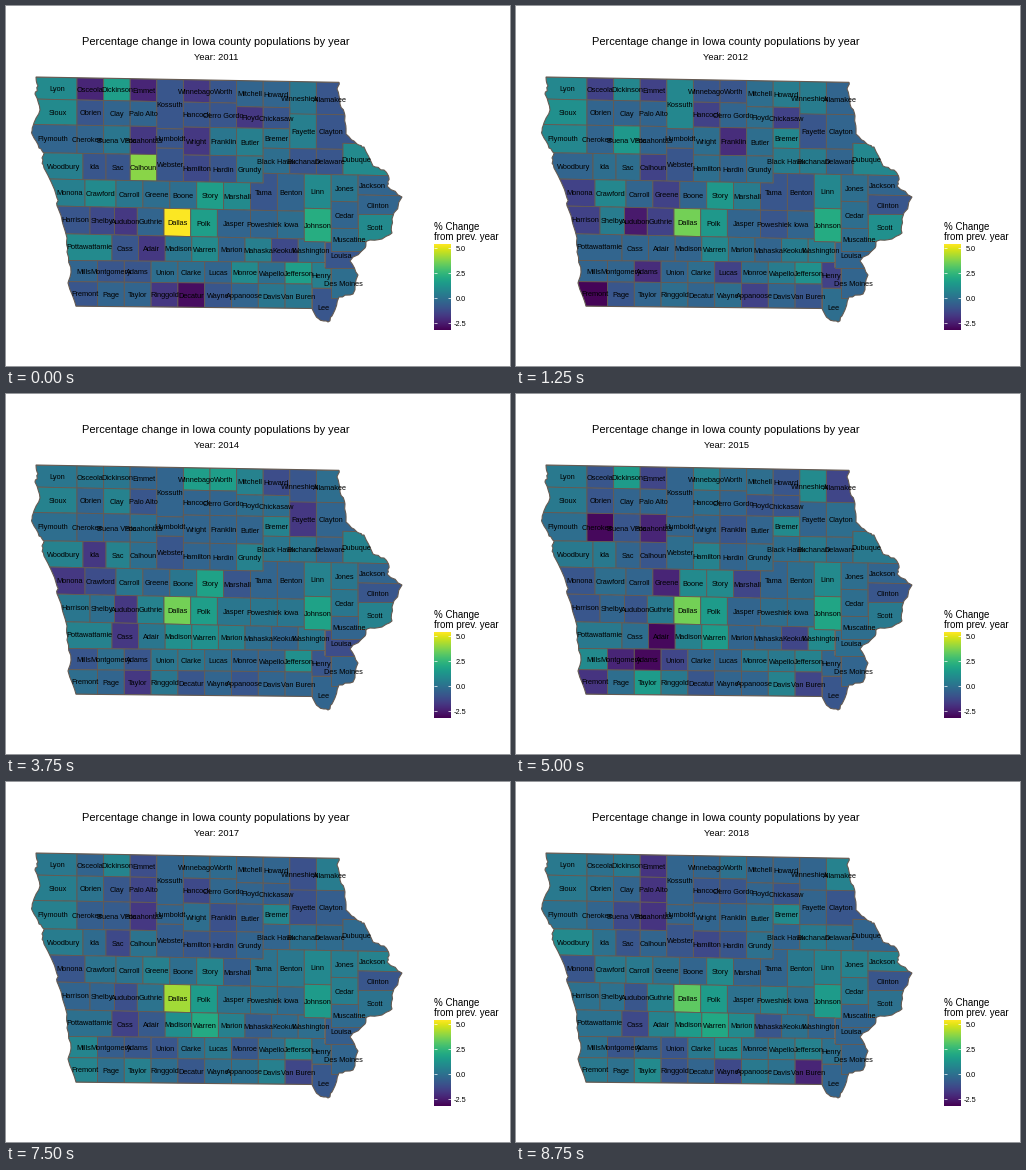
These frames come from a looping animation (504x360 px, 10 s). A matplotlib script:

```python
import numpy as np
import matplotlib.pyplot as plt
from matplotlib.animation import FuncAnimation
from matplotlib.colors import Normalize
from matplotlib.patches import Polygon

plt.rcParams["font.family"] = "Liberation Sans"
W, H, DPI = 504, 360, 72
EDGE = "#645a52"
LOW, HIGH = -3.2, 5.45
TYPICAL = -0.4

# Borders from north to south: height, tilt and the jogs along the way.
LINES = [
    (70.5, 0.0175, {}),
    (92.5, 0.02, {150.8: -22.2, 177.4: 22.2, 230.6: 3.5, 283.8: 6.5}),
    (118, 0.017, {150.8: 2, 177.4: -2, 283.8: -15}),
    (146.3, 0.015, {150.8: -6.5, 177.4: 6.5, 257.2: -8, 337: -6}),
    (172.2, 0.019, {257.2: -9.8}),
    (199, 0.021, {298.3: -3, 325.2: -7.5, 352.1: -7}),
    (226.5, 0.022, {298.3: 2.5, 325.2: -14, 352.1: -13.5}),
    (254, 0.008, {318.8: 5}),
    (275, 0.01, {305.9: 4}),
    (299.5, 0.01, {}),
]


def steps(first, gap, count):
    return [round(first + gap * i, 1) for i in range(count)]


NORTH = [20] + steps(71, 26.6, 10) + [400]
SOUTH = [20] + steps(91.5, 26.8, 9)
ROWS = [
    ("Lyon,Osceola,Dickinson,Emmet,,Winnebago,Worth,Mitchell,Howard,"
     "Winneshiek,Allamakee", NORTH),
    ("Sioux,Obrien,Clay,Palo Alto,Kossuth,Hancock,Cerro Gordo,Floyd,"
     "Chickasaw", NORTH[:10]),
    ("Plymouth,Cherokee,Buena Vista,Pocahontas,Humboldt,Wright,Franklin,"
     "Butler,Bremer,Fayette,Clayton", NORTH),
    ("Woodbury,Ida,Sac,Calhoun,Webster,Hamilton,Hardin,Grundy,Black Hawk,"
     "Buchanan,Delaware,Dubuque",
     [20, 77, 100] + steps(124.2, 26.6, 9) + [400]),
    ("Monona,Crawford,Carroll,Greene,Boone,Story,Marshall,Tama,Benton,Linn,"
     "Jones,Jackson", [20, 79] + steps(110, 26.9, 10) + [400]),
    ("Harrison,Shelby,Audubon,Guthrie,Dallas,Polk,Jasper,Poweshiek,Iowa,"
     "Johnson,Cedar,Clinton",
     [20, 84, 108.5] + steps(131.3, 26.7, 4) + steps(244.5, 26.9, 5) + [400]),
    ("Pottawattamie,Cass,Adair,Madison,Warren,Marion,Mahaska,Keokuk,"
     "Washington", [20] + steps(106, 26.6, 9)),
    ("Mills,Montgomery,Adams,Union,Clarke,Lucas,Monroe,Wapello,Jefferson,"
     "Henry", SOUTH + [325]),
    ("Fremont,Page,Taylor,Ringgold,Decatur,Wayne,Appanoose,Davis,Van Buren",
     SOUTH),
]
# River counties outside the rows: left, top, right, bottom.
RIVER = {
    "Louisa": (318.8, 236, 360, 262),
    "Muscatine": (325.2, 222, 362, 245),
    "Scott": (352, 208, 400, 234.5),
    "Lee": (306, 282, 345, 320),
    "Des Moines": (325, 262, 360, 292),
}
SHIFT = {"Plymouth": -3, "Cherokee": -3, "Winneshiek": -3, "Allamakee": 2}
EAST = [(333, 76.3), (331, 83), (334, 98), (339, 110), (340, 128), (351, 138),
        (358, 141), (367, 160), (378, 164), (383, 172), (381, 180), (396, 191),
        (386, 213), (386, 227), (376, 233), (361, 235), (359, 242), (344, 255),
        (352, 269), (347, 288), (333, 291), (327, 308), (322, 316), (313, 313),
        (306, 302.5)]
WEST = [(70, 300.2), (62, 277), (65, 266), (61, 246), (61, 232), (52, 202),
        (51, 192), (38, 162), (36, 152), (38, 147), (33, 142), (26, 128),
        (27, 120), (34, 104), (29, 88), (32, 80), (30, 71)]

# Percentage change by year; counties not listed sit at the typical value.
CHANGE = {
    2011: {
        5.4: "Dallas", 3.9: "Calhoun", 2.2: "Johnson",
        1.6: "Story,Polk,Jefferson,Dickinson",
        0.9: "Lyon,Sioux,Dubuque,Crawford,Marshall,Linn,Scott,Pottawattamie,"
             "Warren,Monroe",
        0.5: "Butler,Fayette,Woodbury,Monona,Mahaska,Henry",
        0.2: "Winneshiek,Buena Vista,Franklin,Bremer,Grundy,Carroll,Jones,"
             "Madison,Davis,Van Buren",
        -0.1: "Black Hawk,Greene,Boone,Iowa,Washington,Union,Clarke,Wapello,"
              "Des Moines,Muscatine",
        -0.9: "Kossuth,Worth,Allamakee,Obrien,Hancock,Cerro Gordo,Chickasaw,"
              "Humboldt,Clayton,Ida,Sac,Webster,Hardin,Buchanan,Delaware,Tama,"
              "Harrison,Cass,Louisa,Montgomery,Adams,Fremont,Wayne,Lee",
        -1.3: "Hamilton,Shelby,Keokuk",
        -1.8: "Winnebago,Floyd,Wright,Ringgold,Adair,Pocahontas,Audubon",
        -2.3: "Osceola,Emmet", -2.9: "Decatur",
    },
    2012: {
        3.6: "Dallas", 2.1: "Johnson", 1.4: "Polk,Story,Buena Vista",
        1.1: "Sioux,Scott,Jefferson",
        0.8: "Lyon,Dickinson,Kossuth,Plymouth,Bremer,Dubuque,Crawford,Linn,"
             "Warren",
        0.4: "Buchanan,Shelby,Washington,Howard,Winneshiek,Black Hawk,Keokuk,"
             "Wapello,Marshall",
        -0.1: "Mitchell,Floyd,Wright,Ida,Sac,Hamilton,Jones,Cedar,Muscatine,"
              "Clarke,Monroe,Ringgold,Wayne,Lee,Butler,Grundy,Marion",
        -0.9: "Winnebago,Worth,Tama,Poweshiek,Clinton,Page,Van Buren,Fayette,"
              "Webster,Benton",
        -1.5: "Emmet,Hancock,Calhoun,Guthrie,Lucas,Henry,Appanoose,Chickasaw,"
              "Osceola,Monona,Greene,Harrison",
        -2.1: "Franklin,Adams", -2.6: "Audubon", -3.1: "Fremont",
    },
    2014: {
        3.6: "Dallas", 1.8: "Story,Johnson", 1.6: "Winnebago,Worth,Polk",
        1.1: "Madison,Warren,Jefferson",
        0.6: "Sioux,Bremer,Grundy,Dubuque,Linn,Guthrie,Scott,Pottawattamie,"
             "Marion,Mitchell,Clay,Woodbury,Sac",
        0.2: "Lyon,Dickinson,Buchanan,Osceola,Black Hawk,Carroll,Boone,"
             "Harrison,Jasper,Poweshiek,Iowa,Cedar,Washington,Union,Clarke,"
             "Jones,Adair,Ringgold",
        -0.1: "Allamakee,Floyd,Chickasaw,Plymouth,Pocahontas,Calhoun,Lucas,"
              "Montgomery,Shelby,Mahaska,Fremont",
        -0.9: "Winneshiek,Palo Alto,Webster,Marshall,Clinton,Mills,Adams,"
              "Henry,Decatur,Appanoose",
        -1.2: "Howard,Crawford,Louisa",
        -1.8: "Monona,Taylor,Fayette,Ida,Audubon,Cass",
    },
    2015: {
        3.6: "Dallas", 1.9: "Johnson", 1.5: "Dickinson,Polk,Warren,Taylor",
        0.9: "Winneshiek,Bremer,Boone,Story,Linn,Mills,Washington",
        0.6: "Winnebago,Hamilton,Madison,Jefferson,Davis",
        0.3: "Lyon,Sioux,Woodbury,Ida,Buchanan,Dubuque,Guthrie,Scott,"
             "Pottawattamie,Monroe,Wapello,Ringgold",
        -0.1: "Worth,Mitchell,Hancock,Plymouth,Clayton,Webster,Grundy,"
              "Black Hawk,Delaware,Crawford,Benton,Jones,Cedar,Cass,Louisa,"
              "Muscatine,Page,Poweshiek,Iowa",
        -0.9: "Osceola,Howard,Obrien,Floyd,Chickasaw,Buena Vista,Franklin,"
              "Calhoun,Monona,Harrison,Audubon,Clinton,Decatur,Lee",
        -1.4: "Emmet,Marshall,Keokuk,Union,Allamakee,Van Buren",
        -1.9: "Fremont", -2.3: "Pocahontas,Greene,Montgomery",
        -3: "Cherokee,Adair,Adams",
    },
    2016: {
        5.2: "Dallas", 2.1: "Warren", 1.5: "Polk,Johnson,Mills",
        1.1: "Dickinson,Plymouth,Greene,Linn,Wayne,Davis,Jefferson,Fremont",
        0.6: "Sioux,Bremer,Calhoun,Story,Tama,Jackson,Cedar,Madison,Ringgold",
        0.2: "Lyon,Allamakee,Obrien,Cerro Gordo,Wright,Boone,Benton,Jones,"
             "Scott,Marion,Washington,Taylor,Jasper",
        -0.1: "Winnebago,Buena Vista,Woodbury,Dubuque,Crawford,Carroll,"
              "Pottawattamie,Muscatine,Page",
        -0.9: "Osceola,Palo Alto,Cherokee,Hardin,Grundy,Monona,Marshall,"
              "Harrison,Shelby,Clinton,Louisa,Union",
        -1.3: "Clay,Butler,Audubon,Adams,Decatur,Lee",
        -1.7: "Winneshiek,Hancock,Franklin,Cass,Monroe,Pocahontas,Fayette,Sac",
        -2.2: "Adair",
    },
    2018: {
        3.3: "Dallas", 2: "Warren", 1.5: "Polk,Madison,Johnson",
        0.9: "Bremer,Woodbury,Story,Marion,Lucas,Taylor",
        0.6: "Linn,Jones,Jackson,Guthrie,Poweshiek,Adair,Jefferson,Allamakee",
        0.3: "Dickinson,Sioux,Crawford,Carroll,Cedar,Clarke,Appanoose,Lyon,"
             "Buchanan,Benton,Wapello,Fremont",
        0: "Osceola,Obrien,Ida,Grundy,Harrison,Shelby,Jasper,Iowa,Scott,"
           "Pottawattamie,Mills,Page,Worth,Plymouth,Butler,Delaware,Greene,"
           "Keokuk,Monroe,Henry,Davis",
        -0.9: "Hancock,Cerro Gordo,Chickasaw,Clayton,Sac,Webster,Hardin,"
              "Monona,Audubon,Clinton,Mahaska,Montgomery,Union,Ringgold",
        -1.3: "Buena Vista,Hamilton,Cass,Wayne",
        -1.9: "Palo Alto,Emmet,Pocahontas", -2.3: "Van Buren",
    },
}


def border(line, x0, x1):
    base, tilt, jogs = line

    def height(x):
        return base + tilt * x + sum(d for at, d in jogs.items() if at < x)

    pts = [(x0, height(x0 + 0.3))]
    for at in jogs:
        if x0 + 0.5 < at < x1 - 0.5:
            pts += [(at, height(at)), (at, height(at + 0.01))]
    return pts + [(x1, height(x1 - 0.3))]


def build_counties():
    shapes = {}
    for (names, xs), top, low in zip(ROWS, LINES, LINES[1:]):
        for name, x0, x1 in zip(names.split(","), xs, xs[1:]):
            if name:
                shapes[name] = border(top, x0, x1) + border(low, x0, x1)[::-1]
    for name, (x0, y0, x1, y1) in RIVER.items():
        shapes[name] = [(x0, y0), (x1, y0), (x1, y1), (x0, y1)]
    return shapes


def label_spot(name, shape):
    (x0, y0), (x1, y1) = np.min(shape, axis=0), np.max(shape, axis=0)
    y = (y0 + y1) / 2
    wx, wy = np.array(WEST[::-1]).T
    ex, ey = np.array(EAST[:-2]).T
    x0, x1 = max(x0, np.interp(y, wy, wx)), min(x1, np.interp(y, ey, ex))
    return (x0 + x1) / 2 + SHIFT.get(name, 0), y


def roughen(points, rng):
    """Split each stretch of river bank and nudge the new points."""
    out = []
    for a, b in zip(points, points[1:]):
        a, b = np.array(a), np.array(b)
        out.append(a)
        out += [a + (b - a) * t + rng.uniform(-0.9, 0.9, 2)
                for t in (0.25, 0.5, 0.75)]
    return out + [np.array(points[-1])]


def values(year):
    if year not in CHANGE:
        before, after = values(year - 1), values(year + 1)
        return {n: (before[n] + after[n]) / 2 for n in before}
    result = dict.fromkeys(counties, TYPICAL)
    for level, names in CHANGE[year].items():
        result.update(dict.fromkeys(names.split(","), level))
    return result


fig = plt.figure(figsize=(W / DPI, H / DPI), dpi=DPI, facecolor="white")
ax = fig.add_axes([0, 0, 1, 1])
ax.axis("off")
cmap, norm = plt.get_cmap("viridis"), Normalize(LOW, HIGH)


def write(x, y, text, size, ha="center"):
    return ax.text(x, y, text, fontsize=size, ha=ha, va="baseline", zorder=5)


rng = np.random.default_rng(4)
coast = roughen(EAST, rng) + roughen(WEST, rng)
state = Polygon(coast, fc="none", ec=EDGE, lw=1.1, zorder=3)
ax.add_patch(state)

counties = build_counties()
patches = {}
for name, shape in counties.items():
    patch = ax.add_patch(Polygon(shape, ec=EDGE, lw=0.9, joinstyle="round"))
    patch.set_clip_path(state)
    patches[name] = patch
    x, y = label_spot(name, shape)
    write(x, y + 2.6, name, 7.4)

write(210, 39, "Percentage change in Iowa county populations by year", 10.95)
year_text = write(210, 54.3, "", 9.4)

# Colour key
write(428, 223.5, "% Change", 9.8, "left")
write(428, 234, "from prev. year", 9.8, "left")
ax.imshow(np.linspace(HIGH, LOW, 256)[:, None], cmap=cmap, norm=norm,
          extent=(428, 445, 324, 238), aspect="auto", interpolation="bilinear")
for tick in (5, 2.5, 0, -2.5):
    y = 238 + (HIGH - tick) / (HIGH - LOW) * 86
    for x in (428, 441.6):
        ax.plot([x, x + 3.4], [y, y], color="white", lw=0.7,
                solid_capstyle="butt")
    write(459.8, y + 2.6, f"{tick:.1f}", 7.4, "right")

ax.set_xlim(0, W)
ax.set_ylim(H, 0)
YEARS = range(2011, 2019)
table = [values(year) for year in YEARS]


def draw(i):
    year_text.set_text(f"Year: {YEARS[i]}")
    for name, patch in patches.items():
        patch.set_facecolor(cmap(norm(table[i][name])))
    return [year_text, *patches.values()]


anim = FuncAnimation(fig, draw, frames=len(YEARS), interval=1250, repeat=True)
plt.show()
```
